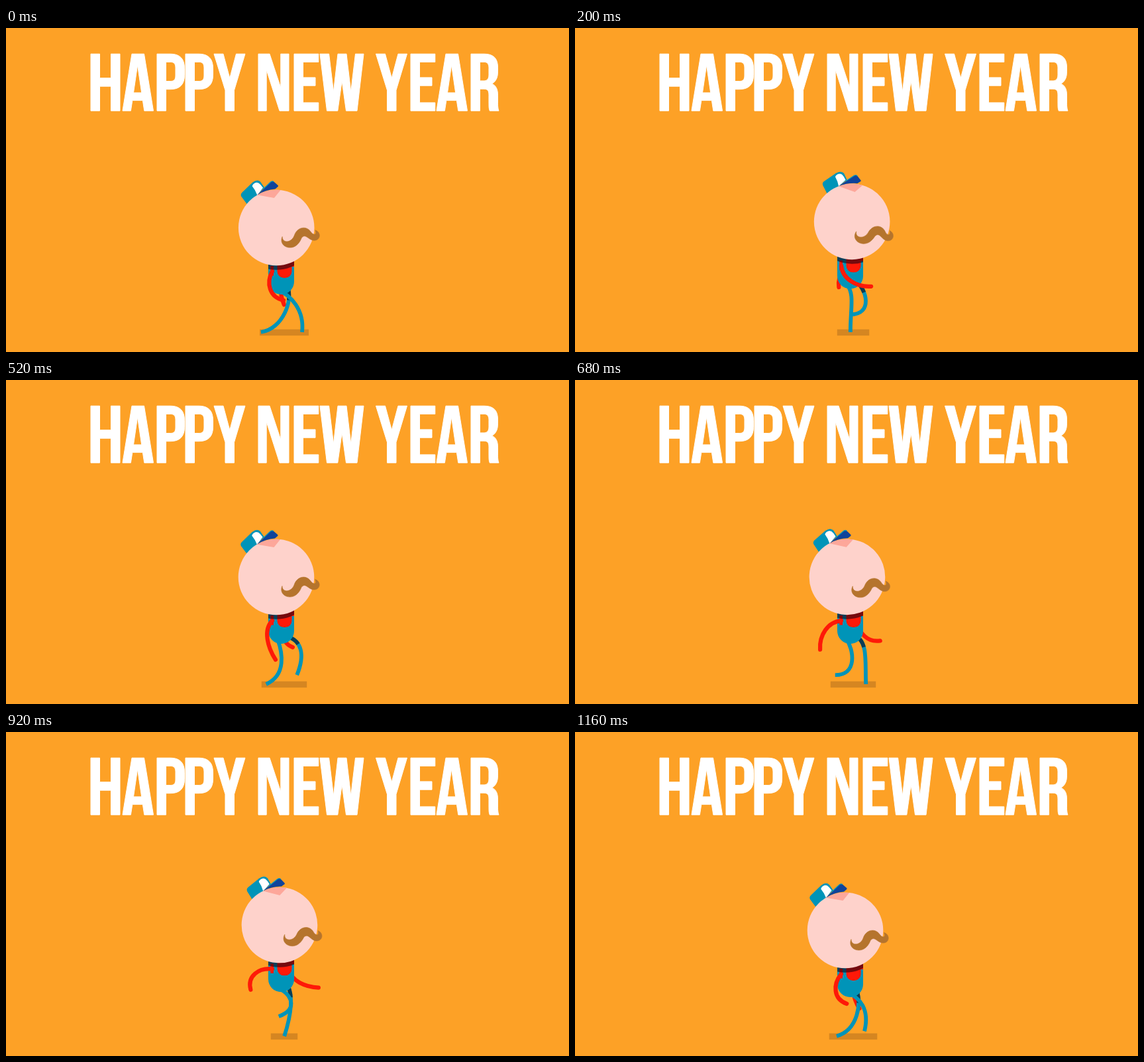
These frames come from a looping animation (850x490 px, 1.2 s). An HTML page:

```html
<!DOCTYPE html>
<html lang="en">
<head>
<meta charset="utf-8">
<title>Happy New Year</title>
<style>
html, body { margin: 0; width: 100%; height: 100%; overflow: hidden; background: #fda126; }
svg { display: block; width: 850px; height: 490px; }
.leg, .arm { fill: none; }
.leg { stroke: #0094b8; stroke-width: 5.8; }
.shade { stroke: #0b3c54; stroke-dasharray: 20 400; }
.arm { stroke: #fe1908; stroke-width: 6.2; stroke-linecap: round; }
</style>
</head>
<body>
<svg viewBox="0 0 850 490">
  <defs>
    <clipPath id="trunk"><rect x="396" y="330" width="39" height="60"/></clipPath>
    <clipPath id="skull"><circle cx="408" cy="302" r="57.3"/></clipPath>
  </defs>
  <rect width="850" height="490" fill="#fda126"/>
  <g id="title" role="img" aria-label="HAPPY NEW YEAR" fill="#fff" stroke="#fff" fill-rule="evenodd"></g>

  <rect id="ground" y="455.7" height="9.5" fill="#d58621"/>
  <path id="farArm" class="arm"/>
  <path id="farLeg" class="leg"/>
  <path id="farShade" class="leg shade"/>
  <path id="nearLeg" class="leg"/>
  <g id="body">
    <path d="M396 340H435V383.5a19.5 19.5 0 0 1-39 0z" fill="#0094b8"/>
    <path d="M410 340H435V361H431.5V368a10 10 0 0 1-10 10h-2a10 10 0 0 1-10-10V340z" fill="#fe1908"/>
    <rect x="399.3" y="360" width="4.7" height="14.5" fill="#fe1908"/>
  </g>
  <path id="nearArm" class="arm"/>
  <g clip-path="url(#trunk)">
    <circle id="chinShade" r="57.3" fill="#140014" opacity=".58"/>
  </g>
  <g id="head">
    <path d="M355.2 255.5Q353 252 356 249L371.5 234Q379 228 384 233L389.5 241L379 253L364.5 268z" fill="#0094b8"/>
    <path d="M371.3 239.5C372 235.5 377 232.5 381 234.5Q384 236.5 387.5 241.5L379 253Q376 245 371.3 239.5z" fill="#fff"/>
    <circle cx="408" cy="302" r="57.3" fill="#fed2cb"/>
    <path d="M378 252.5L404.5 257L415 244H385z" fill="#fda79a" clip-path="url(#skull)"/>
    <path d="M379 252.5L399 233Q402 230.8 404.5 233L409.7 237.5Q411.5 239 409.5 240.5L406 243.5Q392 244.5 379 252.5z" fill="#10439a"/>
    <path d="M388 243.5L399 233Q401.5 231 404 232.5" fill="none" stroke="#0094b8" stroke-width="1.3"/>
    <path d="M417 315.5C417 326 431 325 435 314C439 301 453 298 460 308C463 313 470 314 466.5 305.5C475.5 308 475.5 320 466 321C457 322 452 309 446 317.5C440 333 428 334 421 330C415 326 415 320 417 315.5z" fill="#b5742d" stroke="#b5742d" stroke-width=".6"/>
  </g>
</svg>
<script>
const LOOP = 1200, HALF = LOOP / 2, STEP = 40;
const el = id => document.getElementById(id);

// Condensed capitals, 86 units tall: advance and outline
const glyphs = {
  H: [48, 'M0 0H13.5V36.5H30.5V0H44V86H30.5V49H13.5V86H0z'],
  A: [52, 'M14 0H32.5L46.5 86H32.8L30.4 70.4H14.8L12.4 86H0zM16.5 58.7H28.7L22.6 17z'],
  P: [43, 'M0 0H20.5C35 0 41.5 8 41.5 21.5V32C41.5 45.5 35 53.5 20.5 53.5H13.5V86H0zM13.5 12.3V41.3H20.5C25.5 41.3 28 39 28 32.8V21C28 14.7 25.5 12.3 20.5 12.3z'],
  Y: [52.5, 'M0 0H14L23.8 36.5L33.5 0H47L30.5 55V86H17V55z'],
  N: [54, 'M0 0H17L33.8 51V0H46V86H32L12.2 24V86H0z'],
  E: [39, 'M0 0H36.8V12.3H13.5V35.7H32V48H13.5V73.7H36.8V86H0z'],
  W: [70, 'M0 0H13.6L20.5 57L27 0H40L46.7 57L53.5 0H66L56 86H39.5L33.2 41L26.8 86H10.5z'],
  R: [43, 'M0 0H20C34 0 40.5 7 40.5 20V27C40.5 36 37.5 42 31.5 45C38 47.7 40.5 53.7 40.5 62V75C40.5 79.5 40.8 82.5 42 86H28.3C27.5 83.7 27 82.4 27 75V62C27 55 24.8 53 19 53H13.5V86H0zM13.5 12.3V40.7H18.8C24 40.7 27 38.5 27 31.7V21.2C27 15.2 24.8 12.3 20 12.3z'],
  ' ': [14.5, '']
};
let pen = 128;
for (const ch of 'HAPPY NEW YEAR') {
  const [advance, outline] = glyphs[ch];
  const p = document.createElementNS('http://www.w3.org/2000/svg', 'path');
  p.setAttribute('d', outline);
  p.setAttribute('transform', `translate(${pen} 39.2)`);
  el('title').append(p);
  pen += advance;
}

const wave = (t, peak, period = LOOP) => Math.cos(2 * Math.PI * (t - peak) / period);

// Point at a distance from another; 0 degrees is straight down, positive is forward
const polar = ([x, y], deg, len) => {
  const a = deg * Math.PI / 180;
  return [x + len * Math.sin(a), y + len * Math.cos(a)];
};
const hose = (...points) => {
  const [root, a, b, end] = points.map(p => p.map(n => n.toFixed(2)).join(' '));
  return `M${root}C${a} ${b} ${end}`;
};

// The foot slides back along the ground, then swings forward in the air
function leg(t, hip, center) {
  const phase = t % LOOP / HALF, swing = phase >= 1;
  const k = 2 * (phase % 1) - 1;
  const stride = 12 * k + 24 * k ** 3;
  const foot = [center + (swing ? stride : -stride), swing ? 460 - 30 * (1 - k * k) : 460];
  const thigh = wave(t, -130);
  const knee = [hip[0] + 14 + 7 * thigh, hip[1] + 13 - 7 * thigh];
  const ankle = polar(foot, 136 + 48 * wave(t, 130), 34);
  return hose(hip, knee, [2 * foot[0] - foot[0] + (ankle[0] - foot[0]), ankle[1]], foot);
}

// The whole arm swings; the elbow folds as the reach shortens
function arm(t, shoulder, lean, size) {
  const swing = lean + 54 * wave(t, 230), stretch = wave(t, 430);
  const hand = polar(shoulder, swing, (52 + 8 * stretch) * size);
  const upper = polar(shoulder, swing - 50, 20 * size);
  const lower = polar(hand, swing + 45 - 19 * stretch, -22 * size);
  return hose(shoulder, upper, lower, hand);
}

function draw(t) {
  const rise = -9.7 * Math.abs(Math.sin(Math.PI * t / HALF));
  const other = t + HALF;
  const farLeg = leg(other, [425, 392 + rise], 421);
  el('farLeg').setAttribute('d', farLeg);
  el('farShade').setAttribute('d', farLeg);
  el('nearLeg').setAttribute('d', leg(t, [410, 396 + rise], 411));
  el('farArm').setAttribute('d', arm(other, [428, 369 + rise], 10, 0.88));
  el('nearArm').setAttribute('d', arm(t, [402, 368 + rise], 2, 1));
  el('body').setAttribute('transform', `translate(0 ${rise})`);

  // One forward nod per step, pivoting at the neck
  const nod = 10.2 * ((1 + wave(t, 215, HALF)) / 2) ** 2.3;
  const x = 408 + 58 * Math.sin(nod * Math.PI / 180), y = 302 + rise - 0.07 * nod;
  el('head').setAttribute('transform', `translate(${x} ${y}) rotate(${nod}) translate(-408 -302)`);
  el('chinShade').setAttribute('cx', x);
  el('chinShade').setAttribute('cy', y + 6.5);

  const spread = 28.5 + 8.5 * wave(t, 0, HALF);
  el('ground').setAttribute('x', 420 - spread);
  el('ground').setAttribute('width', 2 * spread);
}

const begin = performance.now();
function tick() {
  const t = (performance.now() - begin) % LOOP;
  draw(Math.floor(t / STEP) * STEP);
  requestAnimationFrame(tick);
}
tick();
</script>
</body>
</html>
```
